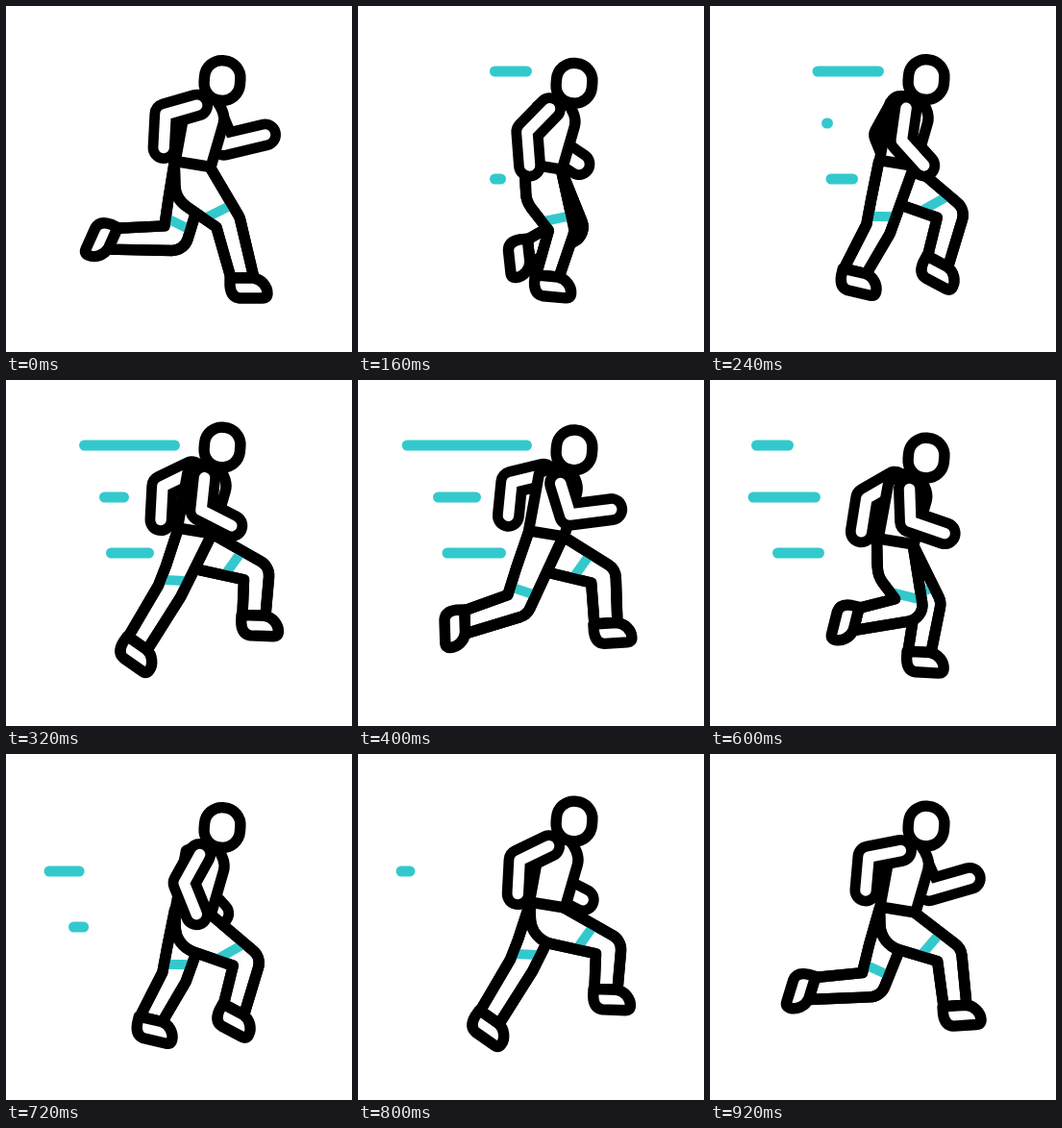
Write an HTML page with a canvas that moves like this. It is 360 px wide and 360 px high and loops after 0.96 s.

```html
<!DOCTYPE html>
<html lang="en">
<head>
<meta charset="utf-8">
<title>Runner</title>
<style>
html, body { margin: 0; width: 100%; height: 100%; overflow: hidden; background: #fff; }
canvas { display: block; width: 360px; height: 360px; }
</style>
</head>
<body>
<canvas id="stage" width="360" height="360"></canvas>
<script>
const ctx = document.getElementById('stage').getContext('2d');
const LOOP = 960, STEP = 40, LINE = 11.4;
const INK = '#000', PAPER = '#fff', ACCENT = '#33c9cc';

// Key poses of one side of the body; the other side runs half a loop later.
// time, knee x y, ankle x y, then angles of foot, upper arm and forearm
const POSES = [
  [0, 231, 225, 246, 283, 0, -74, -3],
  [120, 227, 233, 218, 283, 3, -60, -9],
  [240, 175, 232, 151, 276, 13, -8, 42],
  [320, 170, 220, 137, 274, 35, -6, 63],
  [440, 168, 240, 106, 244, 107, 24, 106],
  [600, 208, 238, 152, 249, 104, 2, 71],
  [720, 251, 216, 237, 266, 28, -29, 22],
  [800, 261, 201, 258, 245, 2, -64, -3],
  [920, 249, 209, 255, 262, -4, -79, -5]
];

// time, rise and fall of the body
const BOB = [[0, -0.5], [120, 3], [240, -1.5], [320, -8], [440, -3]];

// y, start x, end x, then when the left and right tips set off and arrive
const STREAKS = [
  [68, 175.5, 48.5, 73, 407, 415, 665],
  [122, 122.5, 45, 236, 562, 553, 832],
  [180, 148.5, 70.5, 131, 509, 472, 757]
];

const clamp = v => Math.max(0, Math.min(1, v));
const mix = (a, b, k) => a + (b - a) * k;
const between = (p, q, k) => [mix(p[0], q[0], k), mix(p[1], q[1], k)];
const radians = degrees => degrees * Math.PI / 180;
const unit = (x, y) => [x / Math.hypot(x, y), y / Math.hypot(x, y)];
// Angles of the arm are measured forward from straight down.
const reach = ([x, y], degrees, length) =>
  [x + length * Math.sin(radians(degrees)), y + length * Math.cos(radians(degrees))];

// Smooth periodic interpolation through timed rows.
function sample(rows, time, period) {
  const n = rows.length, t = time % period;
  let i = n - 1;
  while (rows[i][0] > t) i--;
  const row = k => rows[(k + n) % n];
  const at = k => row(k)[0] + Math.floor(k / n) * period;
  const span = at(i + 1) - at(i), u = (t - at(i)) / span;
  const slope = (k, c) => (row(k + 1)[c] - row(k - 1)[c]) / (at(k + 1) - at(k - 1)) * span;
  return rows[0].slice(1).map((_, j) => {
    const c = j + 1, a = row(i)[c], b = row(i + 1)[c];
    const ma = slope(i, c), mb = slope(i + 1, c);
    return a + u * (ma + u * (3 * (b - a) - 2 * ma - mb + u * (2 * (a - b) + ma + mb)));
  });
}

function outline(path) {
  ctx.fillStyle = PAPER;
  ctx.strokeStyle = INK;
  ctx.lineWidth = LINE;
  ctx.fill(path);
  ctx.stroke(path);
}

function polyline(points, color, width, cap = 'round') {
  ctx.beginPath();
  points.forEach(p => ctx.lineTo(...p));
  ctx.lineCap = cap;
  ctx.strokeStyle = color;
  ctx.lineWidth = width;
  ctx.stroke();
}

function drawFoot([x, y], angle) {
  ctx.save();
  ctx.translate(x, y);
  ctx.rotate(angle);
  outline(new Path2D('M-1 0H23C32 1 38 9 38 16Q38 21 33 21H9Q0 20 -1 8Z'));
  ctx.restore();
}

function drawLeg([kx, ky, ax, ay, foot], bob) {
  const hipBack = [175 - bob * 0.5, 163 + bob], hipFront = [212 - bob * 0.3, 168 + bob];
  const thigh = unit(kx - 194, ky - 166 - bob), shin = unit(ax - kx, ay - ky);

  // The knee is mitred: wider the more it bends.
  const sumX = thigh[0] + shin[0], sumY = thigh[1] + shin[1];
  const miter = 26 / (sumX * sumX + sumY * sumY);
  const kneeAt = side => [kx + side * sumY * miter, ky - side * sumX * miter];
  const kneeBack = kneeAt(-1), kneeFront = kneeAt(1);

  const angle = radians(foot);
  const ankleAt = side => [ax + side * Math.cos(angle), ay + side * Math.sin(angle)];
  const seat = [hipBack[0] + Math.min(1, (kneeBack[0] - hipBack[0]) * 0.6), hipBack[1] + 38];

  const leg = new Path2D();
  leg.moveTo(...hipBack);
  leg.arcTo(...seat, ...kneeBack, 28);
  leg.lineTo(...kneeBack);
  leg.lineTo(...ankleAt(-12));
  leg.lineTo(...ankleAt(12));
  leg.arcTo(...kneeFront, ...hipFront, 17);
  leg.lineTo(...hipFront);
  outline(leg);

  const hem = 0.52 + 0.23 * clamp((kneeFront[1] - hipFront[1] - 35) / 15);
  polyline([between(seat, kneeBack, 0.7), between(hipFront, kneeFront, hem)], ACCENT, 10, 'butt');
  ctx.strokeStyle = INK;
  ctx.lineWidth = LINE;
  ctx.stroke(leg);
  drawFoot(ankleAt(-12), angle);
}

// The shoulder turns forward and down as the forearm comes up.
function drawArm([upper, fore], bob, shoulderX, turn) {
  const shoulder = [shoulderX + turn * fore, 104 + 0.09 * fore + bob];
  const elbow = reach(shoulder, upper, 34);
  const hand = reach(elbow, fore, 35 + 9 * clamp((fore - 60) / 40));
  const joints = [shoulder, elbow, hand];
  polyline(joints, INK, 33);
  polyline(joints, PAPER, 11.5);
}

function drawTorso(bob) {
  ctx.save();
  ctx.translate(-bob * 0.3, bob);
  outline(new Path2D('M206 94L187 102L176 162L213 168L226 123Q229 112 218 98Z'));
  ctx.restore();
}

function drawHead(bob) {
  const head = new Path2D();
  head.roundRect(-18.7, -20.8, 37.4, 41.6, 18);
  ctx.save();
  ctx.translate(225, 78 + bob);
  ctx.rotate(0.08);
  outline(head);
  ctx.restore();
}

function drawStreaks(t) {
  for (const [y, from, to, leftGo, leftEnd, rightGo, rightEnd] of STREAKS) {
    if (t < leftGo || t >= rightEnd) continue;
    const tip = (go, end) => [mix(from, to, clamp((t - go) / (end - go))), y];
    polyline([tip(leftGo, leftEnd), tip(rightGo, rightEnd)], ACCENT, 11);
  }
}

function render(t) {
  const [bob] = sample(BOB, t, LOOP / 2);
  const near = sample(POSES, t, LOOP), far = sample(POSES, t + LOOP / 2, LOOP);
  ctx.fillStyle = PAPER;
  ctx.fillRect(0, 0, 360, 360);
  ctx.lineJoin = 'round';
  drawStreaks(t);
  drawArm(far.slice(5), bob, 194, 0.19);
  drawLeg(far, bob);
  drawLeg(near, bob);
  drawTorso(bob);
  drawArm(near.slice(5), bob, 199, 0.12);
  drawHead(bob);
}

const start = performance.now();
function tick() {
  const elapsed = (performance.now() - start) % LOOP;
  render(Math.floor(elapsed / STEP) * STEP);
  requestAnimationFrame(tick);
}
tick();
</script>
</body>
</html>
```
